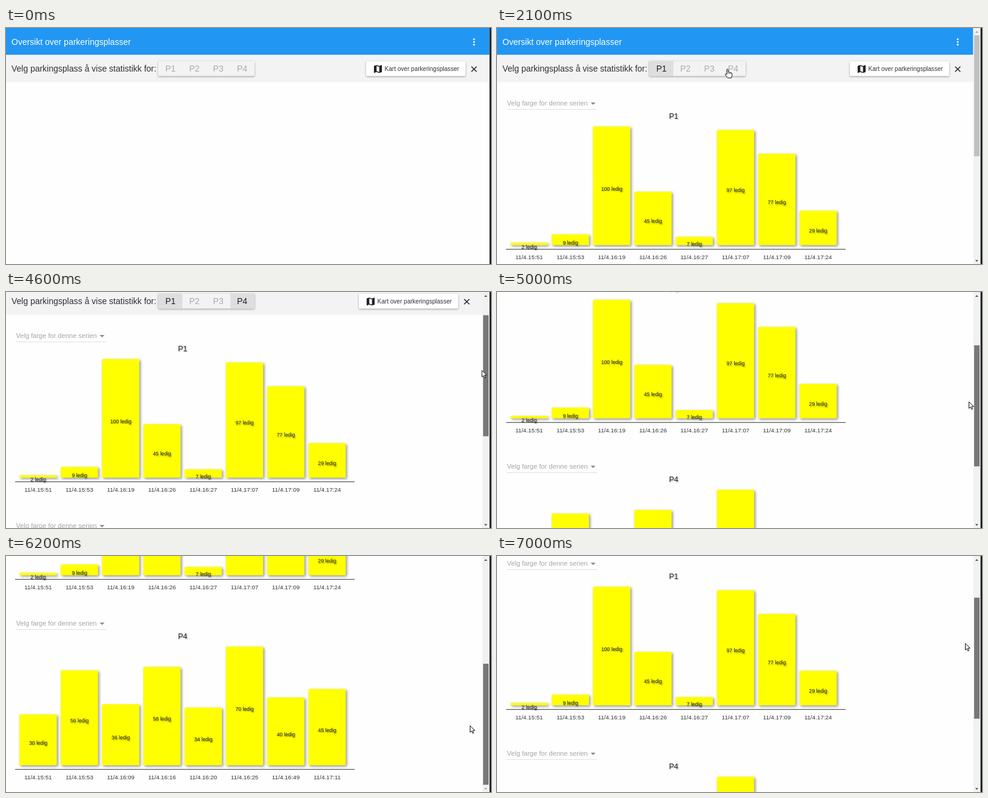
Write an HTML page with a canvas that moves like this. It is 800 px wide and 390 px high and loops after 7.1 s.

```html
<!DOCTYPE html>
<html lang="no">
<head>
<meta charset="utf-8">
<title>Oversikt over parkeringsplasser</title>
<style>
  html, body { margin: 0; width: 100%; height: 100%; overflow: hidden; background: #fefefe; }
  canvas { display: block; width: 800px; height: 390px; }
</style>
</head>
<body>
<canvas id="stage" width="800" height="390"></canvas>
<script>
const ctx = document.getElementById('stage').getContext('2d');
const LOOP = 7100, STEP = 100;
const FONT = '"Liberation Sans", Arial, sans-serif';
const SHOW_P1 = 1400, SHOW_P4 = 2100, MAX_SCROLL = 327;

const charts = [
  { name: 'P1', y: 0, values: [2, 9, 100, 45, 7, 97, 77, 29],
    times: '15:51 15:53 16:19 16:26 16:27 17:07 17:09 17:24'.split(' ') },
  { name: 'P4', y: 314, values: [30, 56, 36, 58, 34, 70, 40, 45],
    times: '15:51 15:53 16:09 16:16 16:20 16:25 16:49 17:11'.split(' ') }
];

// Keys are [time, value, ...].
const scrollKeys = [[4100, 0], [4300, 8], [4600, 52], [5000, 150], [5500, 285],
  [5800, 327], [6200, 327], [6500, 265], [7000, 112]];
const cursorKeys = [[100, 420, 385], [400, 340, 220], [800, 268, 68], [1400, 268, 67],
  [1900, 360, 67], [2100, 377, 67], [2700, 377, 67], [3000, 500, 82], [3500, 733, 123],
  [4000, 786, 104], [4300, 786, 107], [4600, 784.5, 129], [5000, 778, 181],
  [5500, 770, 249], [5800, 766, 276], [6000, 765, 280], [6200, 765, 280],
  [6500, 769, 222], [7000, 772, 144]];

const mapIcon = new Path2D('M20.5 3l-.16.03L15 5.1 9 3 3.36 4.9c-.21.07-.36.25-.36.48V20.5c0 .28.22.5.5.5l.16-.03L9 18.9l6 2.1 5.64-1.9c.21-.07.36-.25.36-.48V3.5c0-.28-.22-.5-.5-.5zM15 19l-6-2.11V5l6 2.11V19z');
const arrowCursor = new Path2D('M.5 .5V11.4L3 9 4.8 13 6.6 12.2 4.9 8.3H8.3Z');
const handCursor = new Path2D('M2 1.5Q3.2-.2 4.2 1.5V6Q5.7 5.1 6.4 6.5 8 5.8 8.6 7.2 10.6 6.8 10.7 8.7V11.6L9.5 15.5H3.4L-.2 10.5Q-1.2 8.9 .3 8.6L2 10Z');

function track(keys, t) {
  if (t <= keys[0][0]) return keys[0].slice(1);
  for (let i = 1; i < keys.length; i++) {
    const a = keys[i - 1], b = keys[i];
    if (t <= b[0]) {
      const p = (t - a[0]) / (b[0] - a[0]);
      return a.slice(1).map((v, k) => v + (b[k + 1] - v) * p);
    }
  }
  return keys[keys.length - 1].slice(1);
}

function rect(x, y, w, h, color) {
  ctx.fillStyle = color;
  ctx.fillRect(x, y, w, h);
}

function rounded(x, y, w, h, r, color) {
  ctx.fillStyle = color;
  ctx.beginPath();
  ctx.roundRect(x, y, w, h, r);
  ctx.fill();
}

function text(str, x, y, size, color, align = 'left') {
  ctx.font = `${size}px ${FONT}`;
  ctx.textAlign = align;
  ctx.fillStyle = color;
  ctx.fillText(str, x, y);
}

function withShadow(color, dx, dy, blur, draw) {
  ctx.save();
  ctx.shadowColor = color;
  ctx.shadowOffsetX = dx;
  ctx.shadowOffsetY = dy;
  ctx.shadowBlur = blur;
  draw();
  ctx.restore();
}

function triangle(x, y, w, h, color) {
  ctx.fillStyle = color;
  ctx.beginPath();
  ctx.moveTo(x - w / 2, y);
  ctx.lineTo(x + w / 2, y);
  ctx.lineTo(x, y + h);
  ctx.fill();
}

function drawHeader(t, width, shift) {
  rect(0, 0, width, 44.5, '#2196f3');
  text('Oversikt over parkeringsplasser', 9, 27.5, 14, '#fff');
  ctx.fillStyle = '#fff';
  for (const y of [18.4, 23, 27.6]) {
    ctx.beginPath();
    ctx.arc(772 - shift, y, 1.5, 0, 7);
    ctx.fill();
  }

  rect(0, 44.5, width, 45, '#f3f3f3');
  text('Velg parkingsplass å vise statistikk for:', 9, 72, 14, '#303030');
  withShadow('rgba(0,0,0,.38)', 0, 1, 3, () => rounded(251, 54.5, 159, 25, 1.5, '#f3f3f3'));
  const selected = [t >= 1200, false, false, t >= 2200];
  selected.forEach((on, i) => {
    if (on) rect(251 + i * 39.7, 54.5, 39.9, 25, '#dedede');
    text('P' + (i + 1), 271.3 + i * 39.4, 72, 14, on ? '#222' : '#aaa', 'center');
  });

  const x = 594 - shift;
  withShadow('rgba(0,0,0,.38)', 0, 1, 3, () => rounded(x, 55, 164, 24.5, 1.5, '#fff'));
  ctx.save();
  ctx.translate(x + 10.7, 59);
  ctx.scale(.73, .73);
  ctx.fillStyle = '#222';
  ctx.fill(mapIcon);
  ctx.restore();
  text('Kart over parkeringsplasser', x + 30.5, 71, 10.05, '#333');

  const cx = 772 - shift;
  ctx.strokeStyle = '#222';
  ctx.lineWidth = 1.5;
  ctx.beginPath();
  for (const d of [-4.3, 4.3]) {
    ctx.moveTo(cx - d, 63.7);
    ctx.lineTo(cx + d, 72.3);
  }
  ctx.stroke();
}

function drawChart({ name, y, values, times }) {
  ctx.save();
  ctx.translate(0, y);
  text('Velg farge for denne serien', 16.5, 128, 11.1, '#a6a6a6');
  triangle(158.5, 123, 8, 4, '#8c8c8c');
  rect(16, 134, 149, 1, '#e0e0e0');
  withShadow('rgba(0,0,0,.3)', 1.5, 1.5, 2, () => text(name, 291.3, 149.7, 12.5, '#222', 'center'));

  const unit = 196 / Math.max(...values);
  values.forEach((value, i) => {
    const x = 22.2 + i * 68.1, h = value * unit;
    withShadow('rgba(0,0,0,.42)', 2, 2, 4, () => rounded(x, 358.7 - h, 61.5, h, 1, '#ff0'));
    text('11/4.' + times[i], x + 30.8, 381.7, 9.8, '#333', 'center');
  });
  rect(15, 365, 560, 1.2, '#555');
  values.forEach((value, i) => {
    withShadow('rgba(0,0,0,.35)', 1.5, 1.5, 2, () =>
      text(value + ' ledig', 53 + i * 68.1, 366.5 - value * unit / 2, 8.65, '#222', 'center'));
  });
  ctx.restore();
}

function drawScrollbar(t, scroll) {
  rect(785.5, 0, 12, 390, '#f1f1f1');
  const size = t >= SHOW_P4 ? 200 : 354;
  const top = 12 + scroll * 166 / MAX_SCROLL;
  rect(787, top, 9, size, t >= 4100 ? '#787878' : '#c1c1c1');
  triangle(791.3, 8, 5, -3, scroll > 0 ? '#505050' : '#a3a3a3');
  triangle(791.3, 383.5, 5, 3, scroll < MAX_SCROLL ? '#505050' : '#a3a3a3');
}

function drawCursor(t) {
  const [x, y] = track(cursorKeys, t);
  const hand = t >= 800 && t < 2800;
  ctx.save();
  ctx.translate(x, y);
  ctx.fillStyle = '#fff';
  ctx.strokeStyle = '#111';
  ctx.lineWidth = 1;
  ctx.lineJoin = 'round';
  const shape = hand ? handCursor : arrowCursor;
  ctx.fill(shape);
  ctx.stroke(shape);
  if (hand) {
    ctx.lineWidth = .7;
    ctx.beginPath();
    for (const fx of [4.2, 6.4, 8.6]) {
      ctx.moveTo(fx, 6.5);
      ctx.lineTo(fx, 9);
    }
    ctx.stroke();
  }
  ctx.restore();
}

function draw(t) {
  const open = t >= SHOW_P1;
  const [scroll] = track(scrollKeys, t);
  rect(0, 0, 800, 390, '#fefefe');
  ctx.save();
  ctx.translate(0, -scroll);
  drawHeader(t, open ? 785.5 : 797.5, open ? 12 : 0);
  if (open) drawChart(charts[0]);
  if (t >= SHOW_P4) drawChart(charts[1]);
  ctx.restore();
  if (open) drawScrollbar(t, scroll);
  rect(797.6, 0, 2.4, 390, '#121a1b');
  if (t >= 100) drawCursor(t);
}

function frame(now) {
  draw(Math.floor(now % LOOP / STEP) * STEP);
  requestAnimationFrame(frame);
}
frame(0);
</script>
</body>
</html>
```
